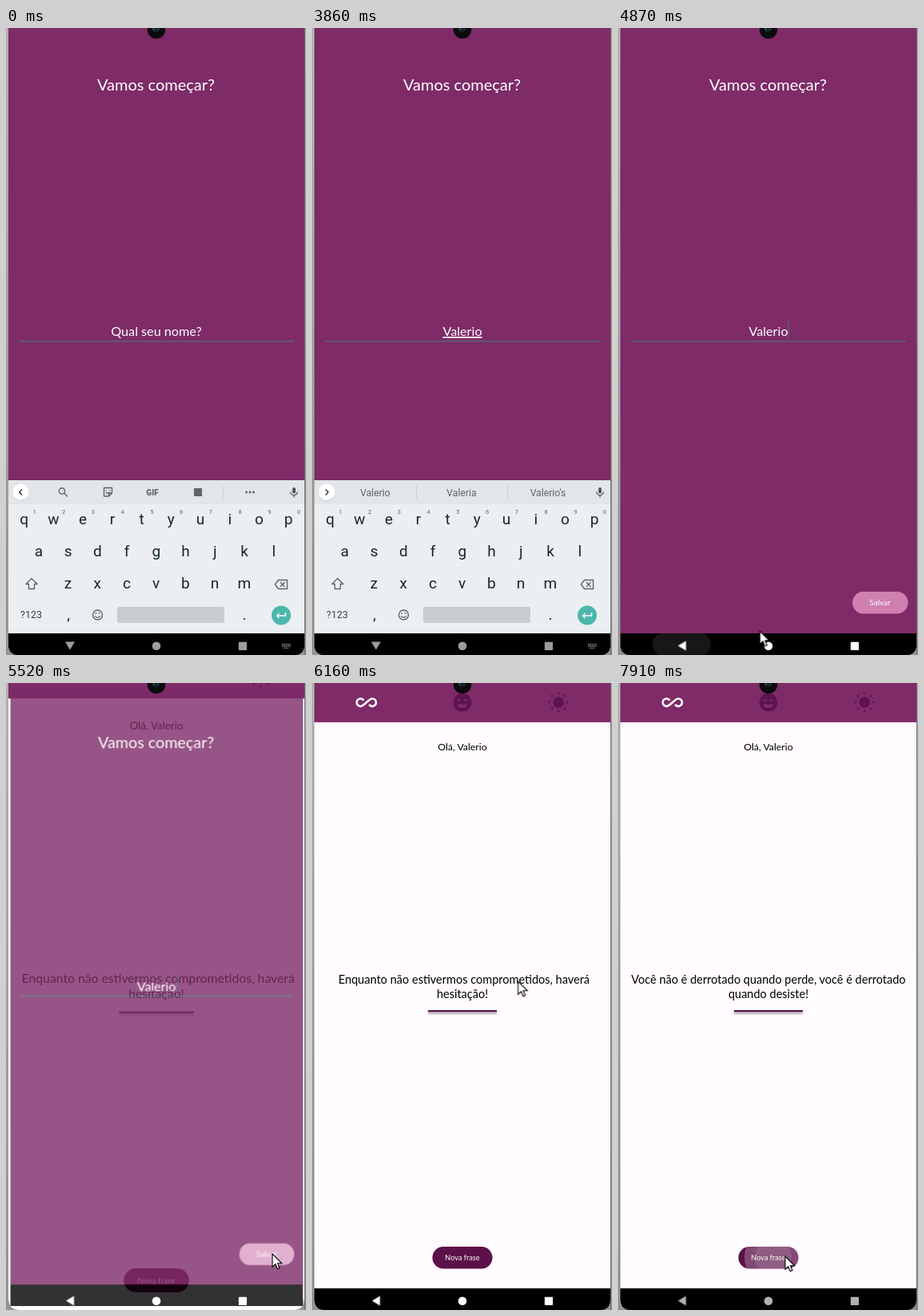
An HTML page for the animation above (7990 ms loop, 375x782 px).

```html
<!DOCTYPE html>
<html lang="pt">
<head>
<meta charset="utf-8">
<title>Vamos começar?</title>
<style>
html, body { margin: 0; width: 100%; height: 100%; overflow: hidden; background: #a9a9a9; }
svg { display: block; width: 100vw; height: 100vh; }
text { text-anchor: middle; font-family: Lato, sans-serif; }
.kb text { font-family: Roboto, sans-serif; fill: #16262e; }
.kb .soft { fill: #5c666b; }
.line { fill: none; stroke: #5c666b; stroke-width: 1.4; stroke-linejoin: round; }

.move { animation: 7990ms linear infinite both; }
.screen { transform-origin: 188px 391px; }
#next { animation-name: next; }
#first { animation-name: first; }
.kb { animation-name: kb; }
#nav { animation-name: nav; }
#back { transform-origin: 80px 770.5px; animation-name: back; }
#kbIcon { animation-name: kbIcon; }
#backRipple { transform-origin: 80px 770px; animation-name: backRipple; }
#mouse { animation-name: mouse; }
.ripple { transform-box: fill-box; transform-origin: center; fill: #fff; }
#saveRipple { animation-name: saveRipple; }
#newRipple { animation-name: newRipple; }

@keyframes next {
  0%, 68.84% { transform: scale(1.1); }
  70.1% { transform: scale(1.036); animation-timing-function: ease-out; }
  74.1%, 100% { transform: none; }
}
@keyframes first {
  0%, 68.84% { transform: none; opacity: 1; }
  70.1% { transform: scale(.935); opacity: .03; animation-timing-function: ease-out; }
  71.1% { transform: scale(.92); opacity: 0; }
  74.1%, 100% { transform: scale(.9); opacity: 0; }
}
@keyframes kb {
  0%, 58.8% { transform: none; opacity: 1; }
  60.9%, 100% { transform: translateY(110px); opacity: 0; }
}
@keyframes nav {
  0%, 57% { fill: #9d9d9d; }
  58%, 86.1% { fill: #fff; }
  95.1%, 100% { fill: #b2b2b2; }
}
@keyframes back {
  0%, 58.8% { transform: none; }
  60.8%, 100% { transform: rotate(90deg); }
}
@keyframes kbIcon {
  0%, 58.8% { opacity: 1; }
  60%, 100% { opacity: 0; }
}
@keyframes backRipple {
  0%, 57.4% { transform: scale(.4); opacity: 0; }
  58.1% { transform: scale(.7); opacity: 1; }
  60%, 61.9% { transform: none; opacity: 1; }
  64%, 100% { transform: none; opacity: 0; }
}
@keyframes saveRipple {
  0%, 67.6% { transform: scale(.2); opacity: 0; }
  68.1% { transform: scale(.4); opacity: .25; }
  69.2% { transform: none; opacity: .25; }
  70%, 100% { transform: none; opacity: 0; }
}
@keyframes newRipple {
  0%, 98% { transform: scale(.3); opacity: 0; }
  98.1% { transform: scale(.4); opacity: 1; }
  99%, 100% { transform: none; opacity: 1; }
}
@keyframes mouse {
  0%, 49.4% { transform: translate(226px, 783px); }
  53.8% { transform: translate(86px, 768px); }
  58.8% { transform: translate(80px, 766px); }
  61% { transform: translate(179px, 752px); }
  63.1% { transform: translate(275px, 728px); }
  66%, 71% { transform: translate(333px, 712px); }
  72.1% { transform: translate(313px, 632px); }
  74.1%, 76% { transform: translate(327px, 437px); }
  77.1% { transform: translate(258px, 373px); }
  79.1% { transform: translate(150px, 153px); }
  81.1% { transform: translate(50px, 260px); }
  83.1% { transform: translate(80px, 380px); }
  85.1% { transform: translate(180px, 400px); }
  86.1% { transform: translate(230px, 362px); }
  88.1% { transform: translate(286px, 430px); }
  91.1% { transform: translate(255px, 620px); }
  95.1%, 100% { transform: translate(209px, 715px); }
}
</style>
</head>
<body>
<svg viewBox="0 0 375 782" preserveAspectRatio="none">
  <defs>
    <linearGradient id="edge" x2="0" y2="1">
      <stop offset="0" stop-color="#b0b0b0"/><stop offset="1" stop-color="#929292"/>
    </linearGradient>
    <clipPath id="phone"><path d="M3 0H373V768Q373 782 360 782H16Q3 782 3 768Z"/></clipPath>
    <clipPath id="aboveNav"><rect width="375" height="755"/></clipPath>
    <clipPath id="saveClip"><rect x="293" y="703" width="69.5" height="27.5" rx="13.7"/></clipPath>
    <clipPath id="newClip"><rect x="150.5" y="703" width="75" height="27.5" rx="13.7"/></clipPath>
    <filter id="blur" x="-10%" y="-200%" width="120%" height="500%"><feGaussianBlur stdDeviation="1.2"/></filter>
  </defs>

  <rect width="375" height="782" fill="url(#edge)"/>
  <rect x="373" width="1" height="782" fill="#6b6b6b"/>

  <g clip-path="url(#phone)">
    <rect x="3" width="370" height="782"/>

    <g id="next" class="move screen">
      <rect x="3" width="370" height="755" fill="#fffbff"/>
      <rect x="3" width="370" height="49" fill="#7e2b68"/>
      <path transform="translate(68 24.3)" fill="none" stroke="#fff" stroke-width="2.6"
        d="M-3.2-2.7C-4.6-4.1-6-4.8-7.3-4.8A4.8 4.8 0 0 0-7.3 4.8C-3 4.8 3-4.8 7.3-4.8A4.8 4.8 0 0 1 7.3 4.8C6 4.8 4.6 4.1 3.2 2.7"/>
      <g fill="#5e1350">
        <circle cx="188" cy="24.3" r="11.3"/>
        <circle cx="308" cy="24" r="6.7"/>
        <circle cx="308" cy="24" r="11.2" fill="none" stroke="#5e1350" stroke-width="2.6" pathLength="80" stroke-dasharray="2.6 7.4" stroke-dashoffset="1.3"/>
      </g>
      <g fill="#7e2b68">
        <circle cx="184" cy="21.6" r="1.7"/><circle cx="192" cy="21.6" r="1.7"/>
        <path d="M181.7 26.4H194.3A6.5 6.5 0 0 1 181.7 26.4Z"/>
      </g>
      <text x="188" y="84.3" font-size="12.3">Olá, Valerio</text>
      <text id="quote1" x="190" y="375" font-size="14.5"></text>
      <text id="quote2" x="188" y="392.5" font-size="14.5"></text>
      <rect x="145" y="410" width="86" height="3" fill="#000" opacity=".3" filter="url(#blur)"/>
      <rect x="145" y="408" width="86" height="2.2" fill="#5c1149"/>
      <g clip-path="url(#newClip)">
        <rect x="150" y="703" width="76" height="28" fill="#5c1149"/>
        <g id="newRipple" class="move ripple">
          <circle cx="194" cy="716" r="36" opacity=".24"/><circle cx="194" cy="716" r="23" opacity=".1"/>
        </g>
      </g>
      <text x="188" y="720.3" font-size="9.2" fill="#fff">Nova frase</text>
    </g>

    <g id="first" class="move screen">
      <rect x="3" width="370" height="755" fill="#7e2b68"/>
      <rect x="3" y="755" width="370" height="27"/>
      <text x="187.5" y="77.5" font-size="20" fill="#fff">Vamos começar?</text>
      <text id="input" x="188" y="384" font-size="16.2" fill="#fff"></text>
      <rect x="16" y="389.8" width="344" height="1.8" fill="#5a5b78"/>
      <rect id="caret" y="365" width="1.5" height="24" fill="#5a5b78"/>
      <g clip-path="url(#saveClip)">
        <rect x="293" y="703" width="70" height="28" fill="#cf7fb0"/>
        <circle id="saveRipple" class="move ripple" cx="332" cy="714" r="45"/>
      </g>
      <text x="327.5" y="720.3" font-size="10" fill="#fff">Salvar</text>
    </g>

    <g clip-path="url(#aboveNav)">
      <g class="kb move">
        <rect x="3" y="564" width="370" height="191" fill="#ebeff2"/>
        <rect x="3" y="564" width="370" height="30" fill="#e2e6e9"/>
        <circle cx="18.5" cy="579.5" r="10.3" fill="#c5c9cc"/>
        <circle cx="18.5" cy="578.8" r="10.2" fill="#fff"/>
        <path id="chevron" class="line" style="stroke:#333"/>
        <g id="tools">
          <g class="line">
            <circle cx="70" cy="577.5" r="3.7"/><path d="M72.8 580.3L77 584.5"/>
            <path d="M122.5 573.5H132.5V580L128.5 584H122.5ZM132.5 580H128.5V584M125 579Q127 581.5 129.5 579M125.3 576.2V577.4M129.5 576.2V577.4"/>
          </g>
          <text class="soft" x="183" y="582.5" font-size="10" font-weight="900">GIF</text>
          <rect x="235" y="574" width="10" height="10" fill="#5c666b"/>
          <path d="M271.5 571V587" stroke="#cfd3d6"/>
          <path d="M300.5 579H300.6M305 579H305.1M309.5 579H309.6" stroke="#5c666b" stroke-width="2.8" stroke-linecap="round"/>
        </g>
        <g id="hints" font-size="12.2">
          <path d="M130.5 571V587M244.5 571V587" stroke="#c9cdd0"/>
          <text class="soft" x="79" y="583.5"></text>
          <text class="soft" x="187" y="583.5"></text>
          <text class="soft" x="295" y="583.5"></text>
        </g>
        <rect x="358" y="573" width="4" height="7.5" rx="2" fill="#4d565b"/>
        <path class="line" d="M355.8 578.5A4.2 4.2 0 0 0 364.2 578.5M360 582.5V585.5"/>
        <g id="keys" font-size="19"></g>
        <path class="line" d="M32 686.5L39 693.5H35.5V699.5H28.5V693.5H25Z"/>
        <path class="line" d="M340.5 688.5H351.5V699.5H340.5L336.3 694ZM343 691.3L348.5 696.8M348.5 691.3L343 696.8"/>
        <text class="soft" x="31.5" y="736.3" font-size="12.5" style="fill:#36444b">?123</text>
        <g class="line">
          <circle cx="114.5" cy="732" r="6"/><path d="M111.3 733.3Q114.5 737.5 117.7 733.3M112.4 729.3V731M116.6 729.3V731"/>
        </g>
        <rect x="139" y="722" width="134" height="20" rx="2" fill="#c8cdd0"/>
        <circle cx="344" cy="732.5" r="12" fill="#4db6ac"/>
        <path class="line" style="stroke:#fff" d="M349.5 729V733H338.5M341.5 730L338.5 733L341.5 736"/>
      </g>
    </g>

    <rect id="backRipple" class="move" x="43" y="755" width="73" height="28" rx="14" fill="#171717"/>
    <g id="nav" class="move">
      <path id="back" class="move" d="M74 765.5H86L80 775.5Z"/>
      <circle cx="188" cy="770.8" r="5.3"/>
      <rect x="290.8" y="765.8" width="10.2" height="10.2" rx=".8"/>
      <path id="kbIcon" class="move" fill="none" stroke="#9d9d9d" stroke-width="1.4" stroke-dasharray="1.4 .9" d="M345 768.7H355.5M345 771H355.5M347 773.4H353.5"/>
    </g>
  </g>

  <circle cx="188" cy="2" r="11.2" fill="#0b0b0d"/>
  <circle cx="187" cy="1" r="4.2" fill="#14242b"/>
  <circle cx="184.5" cy="1.5" r="1.1" fill="#47606b"/><circle cx="191" cy="2" r=".8" fill="#47606b"/>

  <path id="mouse" class="move" d="M0 0V16.3L3.8 12.8 6.3 18.7 9 17.5 6.5 11.8H11.7Z" fill="#fff" stroke="#000" stroke-width="1.1"/>
</svg>
<script>
const LOOP = 7990;
const $ = id => document.getElementById(id);

const key = (ch, x, y) => `<text x="${x}" y="${y}">${ch}</text>`;
const row = (chars, x0, y) => [...chars].map((ch, i) => key(ch, x0 + i * 36.72, y)).join('');
const digits = [...'1234567890']
  .map((d, i) => `<text class="soft" font-size="7.5" x="${35.5 + i * 36.72}" y="606">${d}</text>`).join('');
$('keys').innerHTML = row('qwertyuiop', 22.7, 619.3) + digits + row('asdfghjkl', 41, 659) +
  row('zxcvbnm', 77.5, 699) + key(',', 78, 738) + key('.', 298, 738);

// start time, typed text, two further suggestions
const typing = [
  [1230, 'V', 'Vou', 'Você'],
  [1380, 'Va', 'Vai', 'Vamos'],
  [1460, 'Val', 'Vale', 'Valor'],
  [1540, 'Vale', 'Valeu', 'Valendo'],
  [2080, 'Valer', 'Valeria', 'Valerie'],
  [2230, 'Valeri', 'Valeria', 'Valerio'],
  [2310, 'Valerio', 'Valeria', "Valerio's"]
];
const caretOn = [[360, 920], [1230, 2850], [3310, 3860], [4410, 4950], [5440, 5920]];
const quotes = [
  ['Enquanto não estivermos comprometidos, haverá', 'hesitação!'],
  ['Você não é derrotado quando perde, você é derrotado', 'quando desiste!']
];

const input = $('input'), caret = $('caret');
const hints = [...$('hints').querySelectorAll('text')];
const show = (el, on) => { el.style.visibility = on ? 'visible' : 'hidden'; };

function setText(el, value) {
  if (el.textContent !== value) el.textContent = value;
}

function draw(t) {
  const state = typing.filter(s => s[0] <= t).pop();
  setText(input, state ? state[1] : 'Qual seu nome?');
  input.setAttribute('text-decoration', state && t < 4710 ? 'underline' : 'none');
  show($('tools'), !state);
  show($('hints'), state);
  hints.forEach((el, i) => setText(el, state ? state[i + 1] : ''));
  $('chevron').setAttribute('d', state ? 'M17 575.5L20.3 579L17 582.5' : 'M20 575.5L16.7 579L20 582.5');

  caret.setAttribute('x', state ? 188 + input.getComputedTextLength() / 2 : 187.8);
  show(caret, caretOn.some(([a, b]) => t >= a && t < b));

  const quote = quotes[t < 7900 ? 0 : 1];
  setText($('quote1'), quote[0]);
  $('quote1').setAttribute('x', t < 7900 ? 190 : 188);
  setText($('quote2'), quote[1]);
}

let start;
function tick(now) {
  start ??= now;
  draw((now - start) % LOOP);
  requestAnimationFrame(tick);
}
draw(0);
requestAnimationFrame(tick);
</script>
</body>
</html>
```
